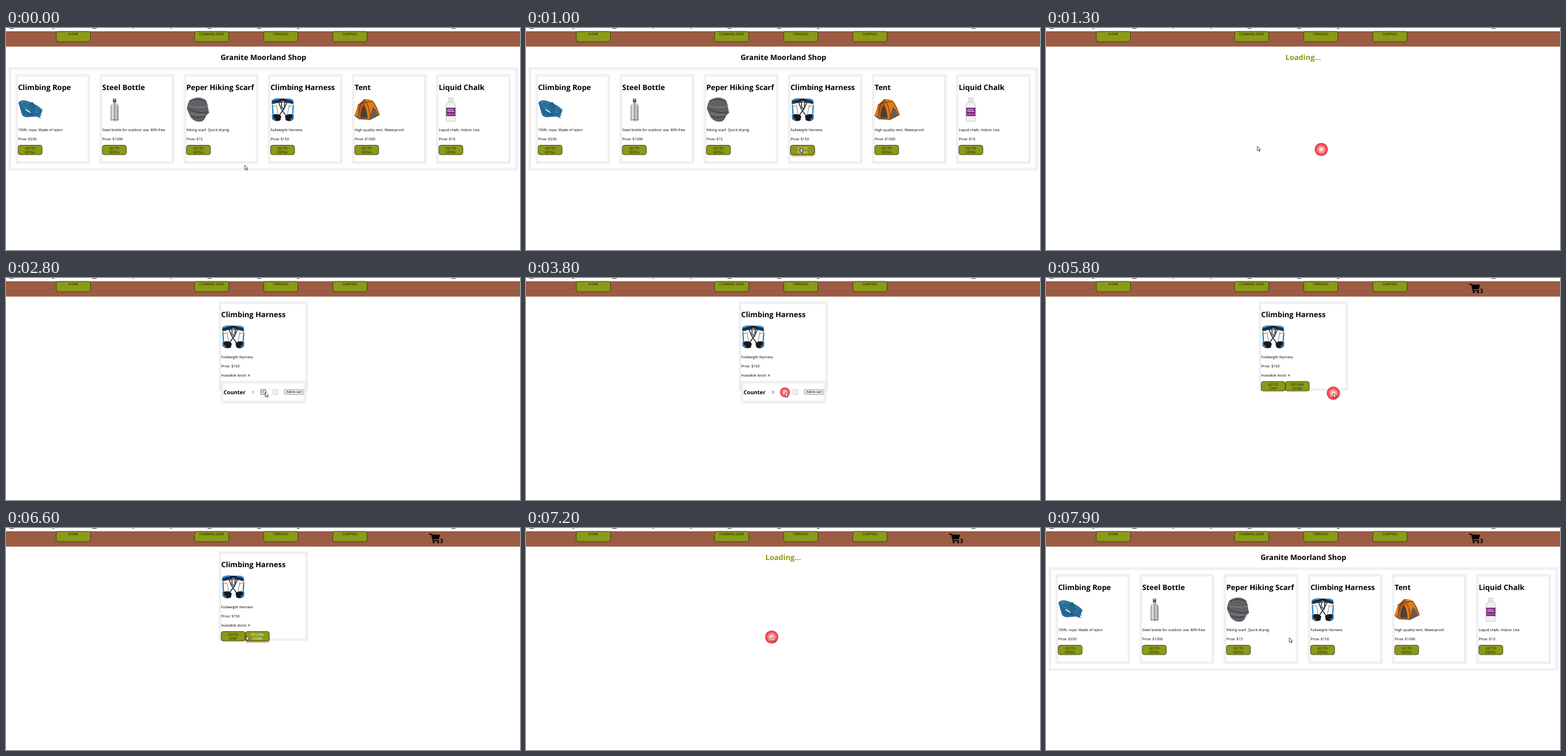
Animation, 788 px wide and 340 px high, one loop 8000 ms. Source, as an HTML page:

```html
<!DOCTYPE html>
<html lang="en">
<head>
<meta charset="utf-8">
<title>Outdoor shop</title>
<style>
html, body { margin: 0; width: 100%; height: 100%; overflow: hidden; background: #fff; }
svg { display: block; font: 5.57px "Open Sans", "Noto Sans", sans-serif; text-rendering: geometricPrecision; }
.h { font-size: 11.35px; font-weight: 700; }
.mid { text-anchor: middle; }
.frame { fill: #fff; stroke: #f0f0f0; stroke-width: 4; }
.btn rect { fill: #8b9a18; stroke: #35390d; stroke-width: .8; }
.btn text { font-size: 5.05px; text-anchor: middle; fill: #16180a; }
.btn.hot text { fill: #fff; }
.btn.hot rect { filter: drop-shadow(0 2px 1px #b4571e99); }
.plain rect { fill: #efefef; stroke: #858585; stroke-width: .7; }
.plain text { font: 4.9px "Liberation Sans", Arial, sans-serif; text-anchor: middle; }
.plain.hot rect { fill: #e0e0e0; stroke: #3c3c3c; }
.off { opacity: .6; }
</style>
</head>
<body>
<svg id="stage" width="788" height="340" viewBox="0 0 788 340">
<defs>
  <radialGradient id="red">
    <stop offset="0" stop-color="#fff" stop-opacity=".9"/>
    <stop offset=".35" stop-color="#fcaab0"/>
    <stop offset=".85" stop-color="#f23a48"/>
    <stop offset="1" stop-color="#e8303e"/>
  </radialGradient>
  <linearGradient id="steel">
    <stop offset="0" stop-color="#8d8b88"/><stop offset=".25" stop-color="#e9e8e6"/>
    <stop offset=".5" stop-color="#a19d99"/><stop offset=".75" stop-color="#d5d3d0"/>
    <stop offset="1" stop-color="#6d6a67"/>
  </linearGradient>
  <pattern id="knit" width="5" height="4" patternUnits="userSpaceOnUse" patternTransform="rotate(-12)">
    <rect width="5" height="4" fill="#66666a"/>
    <path d="M0 1h2M3 2.2h2M1 3.4h2" stroke="#3c3c41" stroke-width=".8"/>
    <path d="M2.6 .8h1.6M.2 2.5h1.4" stroke="#97979b" stroke-width=".6"/>
  </pattern>

  <g id="rope" fill="none" stroke-linecap="round">
    <g id="coils"></g>
    <path d="M19 9q5 6 1 17M22 9q6 6 2 18" stroke="#15537d" stroke-width="2.6"/>
    <path d="M19 9q5 6 1 17M22 9q6 6 2 18" stroke="#4ba0c9" stroke-width="1" stroke-dasharray="1 2"/>
  </g>
  <g id="bottle">
    <path d="M16.5 7V3q2.500-3 5 0v4z" fill="#4a4846"/>
    <circle cx="19" cy="3.500" r="1.300" fill="#d9d7d5"/>
    <path d="M16.500 7h5v2q3.500 2 3.500 6v19q0 2.500-2 2.500h-8q-2 0-2-2.500V15q0-4 3.500-6z" fill="url(#steel)"/>
    <path d="M16.500 7.500h5M13.500 34.500h11" stroke="#64615e" stroke-width=".7"/>
  </g>
  <g id="scarf">
    <path d="M5 5Q10 1 17 .5 27 .5 31 6q2 5 2.500 11l1.500 7q-3 2-5 5-1 5-6 8-6 1.500-11-1-6-3-8-9Q2 22 1 17 2 9 5 5z" fill="url(#knit)"/>
    <path d="M6 6q10-5 24 0M2 17q14 9 32 6M8 29q8 4 20 0" fill="none" stroke="#36363a" stroke-width="1"/>
    <path d="M3 13q12 4 29 1M7 25q10 4 21 2" fill="none" stroke="#a0a0a4" stroke-width=".7"/>
  </g>
  <g id="harness" fill="none" stroke-linecap="round">
    <path d="M3 5q15-5 31 0l1 5q-16-5-32 0z" fill="#18253a" stroke="#101620"/>
    <path d="M4 4.500q5-2 9-2M26 3q5 0 8 2" stroke="#2b8fd8" stroke-width="2.500"/>
    <path d="M3 9q15-4 32 0" stroke="#2c3b4d" stroke-width="2"/>
    <path d="M2 9q2 6 6 5M35 9q-2 6-6 5" stroke="#b28a45" stroke-width="1"/>
    <path d="M13 9l3 8 9 13M25 9l-4 8-9 13M17 8v7l4 3 1-10" stroke="#333a42" stroke-width="1.500"/>
    <path d="M9 12l3 15M29 12l-3 15" stroke="#7e8589" stroke-width=".9"/>
    <path d="M5 27q6-2 11 2l-1 6q-7 3-12-2zM34 27q-6-2-11 2l1 6q7 3 11-2z" fill="#15191f" stroke="#11151b"/>
    <path d="M3 28q0 5 4 6M35 28q0 5-4 6M3 13l1 14M35 13l-1 14" stroke="#2585cb" stroke-width="2"/>
    <circle cx="19" cy="7" r="1.500" stroke="#a4a9ac"/>
  </g>
  <g id="tent">
    <path d="M0 28L5 12 15 3q7-1 13 3 7 8 10 21l-14 7-17-1z" fill="#e27b18"/>
    <path d="M5 12l10-9 2 11 2 19-12 0z" fill="#bd5d12"/>
    <path d="M9 31Q9 17 14 12q5 6 6 20z" fill="#4c403a"/>
    <path d="M24 33Q25 19 29 15q5 5 7 13z" fill="#6f5b4b"/>
    <path d="M15 3Q23 13 24 33M15 3Q6 14 5 32M28 6Q34 16 38 27M5 12Q16 7 28 6" fill="none" stroke="#47311f" stroke-width=".9"/>
    <path d="M0 28l7 5 17 1 14-7" fill="none" stroke="#555" stroke-width="1.300"/>
  </g>
  <g id="chalk">
    <path d="M15 1h7v6h-7z" fill="#e8e8ea" stroke="#b9b9bd" stroke-width=".6"/>
    <path d="M16 7h5q5 2 5 6v21q0 3-2 3H13q-2 0-2-3V13q0-4 5-6z" fill="#f0f0f2" stroke="#bcbcc1" stroke-width=".7"/>
    <path d="M11.400 16h14.200v13H11.400z" fill="#7b3482"/>
    <path d="M13 19h9M13 21.500h11" stroke="#e8cdea" stroke-width="1"/>
    <path d="M12 26h13" stroke="#c75a95" stroke-width="1.500"/>
  </g>
</defs>

<g fill="#555" id="strip"></g>
<rect y="5" width="788" height="23.500" fill="#9b5c43"/>
<g id="nav"></g>
<g id="cart">
  <path d="M649 9.500h3.500l2.500 10h8.500" fill="none" stroke="#000" stroke-width="1.700" stroke-linejoin="round" stroke-linecap="round"/>
  <path d="M652.500 10.300h12.800l-1.700 7h-9.500z"/>
  <circle cx="655.700" cy="22" r="1.600"/><circle cx="662.300" cy="22" r="1.600"/>
  <text x="665" y="23" font-size="9" font-weight="700">3</text>
</g>

<g id="list">
  <text class="h mid" x="394.500" y="49">Granite Moorland Shop</text>
  <rect class="frame" x="6" y="62.200" width="777" height="154.300"/>
</g>
<text id="loading" class="h mid" x="394.300" y="49" fill="#8b9a18">Loading...</text>
<g id="detail">
  <rect class="frame" x="328" y="38" width="133" height="133"/>
  <text class="h" x="329.700" y="60">Climbing Harness</text>
  <use href="#harness" x="329.500" y="71"/>
  <text x="329.700" y="122.500">Fullweight Harness</text>
  <text x="329.700" y="136.500">Price: $150</text>
  <text x="329.700" y="150.500">Available stock: 4</text>
  <g id="counter">
    <rect class="frame" x="331.300" y="159.500" width="127.300" height="30.500"/>
    <path d="M329.500 158v15M460.500 158v15" stroke="#e2e2e2"/>
    <text x="333.500" y="178" font-size="8.270" font-weight="700">Counter</text>
    <text id="count" x="376.800" y="177"></text>
  </g>
  <g id="after"></g>
</g>

<circle id="ring" fill="url(#red)"/>
<path id="cursor" d="M0 0v7l1.700-1.500 1.200 2.600 1.100-.5-1.200-2.500h2.200z" fill="#fff" stroke="#222" stroke-width=".7"/>
</svg>

<script>
const $ = id => document.getElementById(id);
const add = (id, markup) => $(id).insertAdjacentHTML("beforeend", markup);
const buttons = [];

// Lines of text are spread from the given first baseline.
function button(parent, x, y, w, h, lines, base, radius = 3, kind = "btn") {
  const text = lines.map((s, i) => `<text x="${x + w / 2}" y="${base + i * 5.9}">${s}</text>`).join("");
  add(parent, `<g class="${kind}"><rect x="${x}" y="${y}" width="${w}" height="${h}" rx="${radius}"/>${text}</g>`);
  buttons.push({ el: $(parent).lastElementChild, parent, x, y, w, h });
}

[[5, 7], [71, 3], [132, 7], [194, 2], [252, 2], [309, 6], [385, 6], [446, 4], [683, 6]]
  .forEach(([x, w]) => add("strip", `<rect x="${x}" width="${w}" height="1"/>`));

[[77, "HOME"], [289, "CLIMBING GEAR"], [395, "TREKKING"], [501, "CAMPING"]]
  .forEach(([x, s]) => button("nav", x, 5.2, 52.5, 15.8, [s], 11.3));

for (let i = 0; i < 5; i++) {
  const d = `M${2 + i} ${9 + i * 2.8}Q${6 + i} ${3 + i * 2.6} 19 ${9 + i * 3}T${36 - i} ${20 + i * 2.4}Q30 ${31 - i} 18 ${25 + i}T${2 + i} ${9 + i * 2.8}`;
  add("coils", `<path d="${d}" stroke="#1b5f8c" stroke-width="2.7"/>
    <path d="${d}" stroke="#499cc6" stroke-width=".8" stroke-dasharray="1 2.2"/>`);
}

[
  ["Climbing Rope", "rope", "100ft. rope. Made of nylon", 200],
  ["Steel Bottle", "bottle", "Steel bottle for outdoor use. BPA free", 1000],
  ["Peper Hiking Scarf", "scarf", "Hiking scarf. Quick drying", 15],
  ["Climbing Harness", "harness", "Fullweight Harness", 150],
  ["Tent", "tent", "High quality tent. Waterproof.", 1000],
  ["Liquid Chalk", "chalk", "Liquid chalk. Indoor Use", 10]
].forEach(([name, art, note, price], i) => {
  const x = 18.4 + 129 * i;
  add("list", `<rect class="frame" x="${x - 1.9}" y="72.500" width="110.500" height="133.500"/>
    <text class="h" x="${x}" y="95">${name}</text>
    <use href="#${art}" x="${x}" y="106"/>
    <text x="${x}" y="157.500">${note}</text>
    <text x="${x}" y="171.700">Price: $${price}</text>`);
  button("list", x + .3, 179.6, 36.6, 14.4, ["GO TO", "DETAIL"], 185.8);
});

button("counter", 390.5, 171, 8, 7.3, ["+"], 176.3, .8, "plain");
button("counter", 409.3, 171, 7, 7.3, ["-"], 176.3, .8, "plain off");
button("counter", 426.7, 171, 29.6, 7.3, ["Add to cart"], 176.4, .8, "plain");
button("after", 330, 158.6, 36.6, 14.4, ["GO TO", "CART"], 164.8);
button("after", 367, 158.6, 36.6, 14.4, ["RETURN", "HOME"], 164.8);

// Pointer path: time, x, y
const path = [
  [0, 366, 210], [500, 418, 182.5], [600, 418, 182.5], [800, 420.5, 184], [1100, 420.5, 184],
  [1500, 227.5, 178], [1600, 227.5, 178], [1800, 227, 178], [1900, 227, 178], [2800, 397.5, 175],
  [4400, 397.5, 175], [4700, 441.7, 175.5], [5400, 441.7, 175.5], [5600, 440.5, 176.5],
  [6000, 440.5, 176.5], [6300, 405, 175], [6400, 390, 167], [6500, 360, 164], [6700, 377, 167],
  [7700, 377, 167], [7900, 373, 168], [8000, 373, 168]
];
// Clicks: start, end, x, y, largest radius
const clicks = [
  [1000, 1500, 422, 186, 13], [2900, 3600, 397, 176, 6], [3600, 4100, 397, 175, 13],
  [5500, 6000, 440.5, 176.3, 13], [6900, 7400, 376.7, 167, 13]
];

function pointer(t) {
  const i = path.findIndex(p => p[0] > t);
  const [t0, x0, y0] = path[i - 1], [t1, x1, y1] = path[i];
  const k = (t - t0) / (t1 - t0);
  return [x0 + (x1 - x0) * k, y0 + (y1 - y0) * k];
}

const show = (id, on) => { $(id).style.display = on ? "" : "none"; };

function draw(t) {
  const list = t < 1100 || t >= 7600;
  const detail = t >= 1500 && t < 7000;
  const bought = t >= 5600;
  const visible = { list, detail, loading: !list && !detail, counter: !bought, after: bought, cart: bought };
  for (const id in visible) show(id, visible[id]);
  $("count").textContent = t < 3100 ? 1 : t < 3700 ? 2 : 3;

  const [x, y] = pointer(t);
  $("cursor").setAttribute("transform", `translate(${x} ${y})`);
  for (const b of buttons) {
    const over = x >= b.x && x <= b.x + b.w && y >= b.y && y <= b.y + b.h;
    b.el.classList.toggle("hot", over);
  }

  const click = clicks.find(c => t >= c[0] && t < c[1]);
  show("ring", click);
  if (click) {
    const [start, , cx, cy, max] = click;
    $("ring").setAttribute("cx", cx);
    $("ring").setAttribute("cy", cy);
    $("ring").setAttribute("r", Math.min(max, 2.6 + (t - start) * .025));
  }
}

const begin = performance.now();
function tick() {
  const t = Math.max(0, performance.now() - begin) % 8000;
  draw(Math.floor(t / 100) * 100);
  requestAnimationFrame(tick);
}
tick();
</script>
</body>
</html>
```
